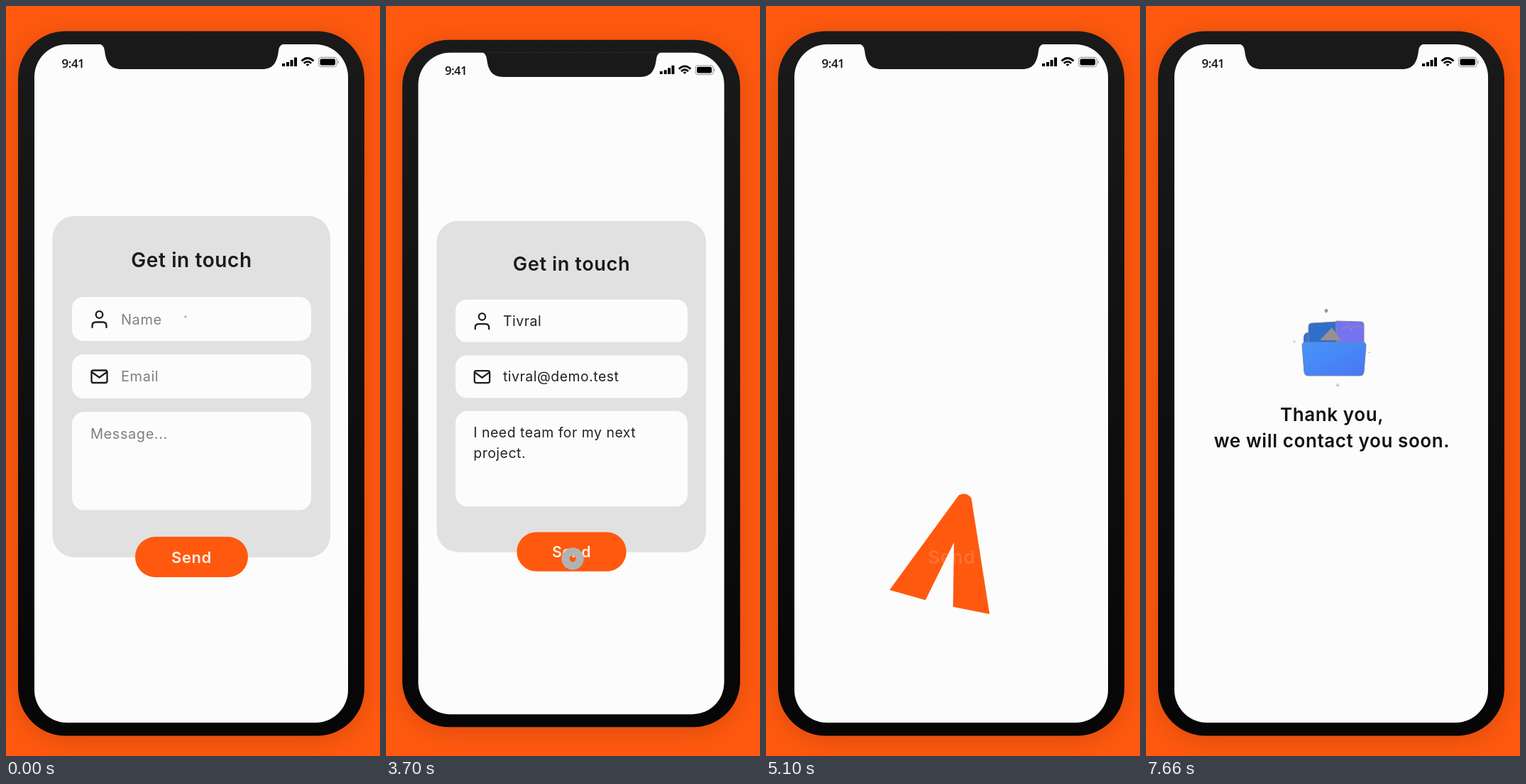
Recreate the animation shown at these times as an HTML page. Size 527 px wide and 1057 px high, loop 7700 ms.

```html
<!DOCTYPE html>
<html lang="en">
<head>
<meta charset="utf-8">
<title>Contact form</title>
<style>
  html, body { margin: 0; width: 100%; height: 100%; overflow: hidden; background: #ff590f; }
  svg { display: block; width: 100vw; height: 100vh; font-family: Inter, sans-serif; }
  #body { filter: drop-shadow(0 5px 18px rgba(0, 0, 0, .15)); }
  .field { fill: #fcfcfc; }
  .input { font-size: 20px; letter-spacing: .55px; fill: #222; }
  .bold { font-weight: 600; letter-spacing: .6px; text-anchor: middle; }
  .icon { fill: none; stroke: #1c1c1c; stroke-width: 2.3; stroke-linecap: round; stroke-linejoin: round; }
</style>
</head>
<body>
<svg viewBox="0 0 527 1057">
  <defs>
    <linearGradient id="case" x2="0" y2="1">
      <stop stop-color="#1a1a1a"/><stop offset="1" stop-color="#060606"/>
    </linearGradient>
    <linearGradient id="blue" x2="1" y2="1">
      <stop stop-color="#4596f8"/><stop offset="1" stop-color="#4a76f4"/>
    </linearGradient>
  </defs>

  <g id="phone">
    <rect id="body" x="17" y="35.5" width="488" height="993" rx="67" fill="url(#case)"/>
    <rect x="40" y="54" width="442" height="956" rx="46" fill="#fcfcfc"/>
    <path d="M130 53.500C136 54 138 57 139 63C141 80 147 89 163 89H361C376 89 382 80 384 63C385 57 387 54 393 53.500Z" fill="#191919"/>

    <text x="78.500" y="86.500" font-family="Open Sans, sans-serif" font-size="17" font-weight="600" letter-spacing="-.5" fill="#111">9:41</text>
    <path d="M391 85V81M397 85V79M402.500 85V76M408 85V72.500" stroke="#000" stroke-width="4"/>
    <g fill="none" stroke="#000" stroke-width="2.700">
      <path d="M416.500 77.500Q425 69.500 433.500 77.500M419.800 80.800Q425 76 430.200 80.800"/>
      <path d="M422.500 82.500Q425 80.500 427.500 82.500L425 85Z" fill="#000" stroke="none"/>
    </g>
    <rect x="440.500" y="72.500" width="25.500" height="13" rx="3.500" fill="none" stroke="#aaa" stroke-width="1.300"/>
    <rect x="442.500" y="74.500" width="21.500" height="9" rx="2" fill="#000"/>
    <path d="M468 77V81" stroke="#aaa" stroke-width="1.500"/>
  </g>

  <g id="form">
    <g id="card">
      <rect x="65.500" y="296" width="391.500" height="481" rx="31" fill="#e1e1e1"/>
      <text class="bold" x="261.500" y="368" font-size="28" fill="#1a1a1a">Get in touch</text>
      <rect class="field" x="93" y="410" width="337" height="62" rx="16"/>
      <rect class="field" x="93" y="491" width="337" height="62" rx="16"/>
      <rect class="field" x="93" y="572" width="337" height="138.500" rx="17"/>
      <g class="icon">
        <circle cx="131.500" cy="435" r="4.800"/>
        <path d="M121.500 453V450.500Q121.500 445.500 127 445.500H136Q141.500 445.500 141.500 450.500V453"/>
        <rect x="120.500" y="513.500" width="22" height="17.500" rx="2.500"/>
        <path d="M121 516L131.500 523.500L142 516"/>
      </g>
      <text class="input" id="name" x="162" y="448.500"/>
      <text class="input" id="email" x="162" y="529"/>
      <text class="input" id="line1" x="119" y="610"/>
      <text class="input" id="line2" x="119" y="640"/>
    </g>
    <path id="plane" fill="#ff590f" stroke="#ff590f" stroke-linejoin="round"/>
    <text class="bold" id="send" font-size="22" y="8" fill="#fff0e8">Send</text>
  </g>
  <circle id="ring" fill="none" stroke="#b2b2b2"/>

  <g id="thanks">
    <path d="M222 514V468Q222 460 229 460H300Q307 460 307 468V514Z" fill="#3b6fd0"/>
    <g id="papers">
      <path d="M229 510V452Q229 447 234 447L268 445V510Z" fill="#2f6fcb" stroke="#7f868f"/>
      <path d="M268 510V444L303 445Q307 445 307 449V510Z" fill="#7573f2" stroke="#8a83a8"/>
      <path d="M276 456L284 451L289 456L297 450L303 453" fill="none" stroke="#8c82c4" stroke-width="2"/>
      <path d="M245 471L262 453L275 471Z" fill="#96918f"/>
    </g>
    <path id="flap" fill="url(#blue)" stroke="#6d86b4"/>
    <path d="M254 426L257 429.500L254 433L251 429.500Z" fill="#999"/>
    <path d="M209 470L211 474H207ZM315 486.500L317 489H313ZM270 531L273 536H267Z" fill="#ccc"/>
    <g class="bold" font-size="26" fill="#111">
      <text x="262" y="585">Thank you,</text>
      <text x="262" y="622">we will contact you soon.</text>
    </g>
  </g>
</svg>

<script>
const LOOP = 7700;
const el = Object.fromEntries([...document.querySelectorAll('[id]')].map(e => [e.id, e]));
const set = (e, attrs) => { for (const k in attrs) e.setAttribute(k, attrs[k]); };

const mix = (a, b, p) => a + (b - a) * p;
const progress = (t, a, b) => Math.min(1, Math.max(0, (t - a) / (b - a)));
const smooth = p => p * p * (3 - 2 * p);
const easeOut = p => 1 - (1 - p) ** 2;

// Smooth interpolation through [time, value] stops.
function track(t, ...stops) {
  let value = stops[0][1];
  for (let i = 1; i < stops.length; i++)
    value = mix(value, stops[i][1], smooth(progress(t, stops[i - 1][0], stops[i][0])));
  return value;
}

const zoom = scale => `translate(261 531.5) scale(${scale}) translate(-261 -531.5)`;

// Half outlines: tip x, tip y, tip control y, base x, base y, inner x, inner y, notch y
const PILL = [0, 6.5, 6.5, 51, 6.5, 25, 6.5, 6.5];
const BLUNT = [9, -81, -88, 72.5, 72, 20, 74, -14.5];
const SHARP = [0, -68, -68, 65, 72, 14, 72, -20];
const morph = (a, b, p) => a.map((v, i) => mix(v, b[i], p));
const outline = ([tx, ty, cy, bx, by, ix, iy, ny]) =>
  `M${-bx} ${by}L${-tx} ${ty}Q0 ${cy} ${tx} ${ty}L${bx} ${by}L${ix} ${iy}L0 ${ny}L${-ix} ${iy}Z`;

function type(t, e, text, start, end, placeholder = '') {
  const typed = text.slice(0, Math.ceil(text.length * progress(t, start, end)));
  e.textContent = typed || placeholder;
  e.style.fill = typed ? '' : '#808080';
}

// Tap marker: start, duration, x, y
const TAPS = [[-24, 560, 253, 438], [790, 600, 253, 522], [2150, 450, 253, 606], [3380, 600, 263, 779]];

function drawTap(t) {
  const tap = TAPS.find(([start, length]) => t > start && t < start + length);
  el.ring.style.display = tap ? '' : 'none';
  if (!tap) return;
  const p = (t - tap[0]) / tap[1];
  const outer = 20 * easeOut(p), hole = 20 * Math.max(0, (p - .4) / .6);
  set(el.ring, { cx: tap[2], cy: tap[3], r: (outer + hole) / 2, 'stroke-width': Math.max(0, outer - hole) });
}

function drawForm(t) {
  type(t, el.name, 'Tivral', 500, 780, 'Name');
  type(t, el.email, 'tivral@demo.test', 1440, 2110, 'Email');
  type(t, el.line1, 'I need team for my next', 2400, 2550, 'Message...');
  type(t, el.line2, 'project.', 2550, 2620);

  // The form is pressed slightly deeper than the phone around it.
  const press = Math.sin(Math.PI * progress(t, 3400, 4120));
  set(el.phone, { transform: zoom(1 - .0255 * press) });
  set(el.form, { transform: zoom(1 - .031 * press) });

  const swell = easeOut(progress(t, 3960, 4120));
  const size = 1 - progress(t, 4140, 4470) ** 2;
  const y = mix(777, 536.5 - 10 * swell, size);
  el.card.style.display = size > 0 ? '' : 'none';
  set(el.card, {
    transform: `translate(261.5 ${y}) scale(${size * (1 + .025 * swell)} ${size * (1 + .036 * swell)}) translate(-261.5 -536.5)`
  });
}

function drawPlane(t) {
  const fold = smooth(progress(t, 4440, 4900));
  const shape = morph(morph(PILL, BLUNT, fold), SHARP, smooth(progress(t, 5440, 5960)));
  const tilt = track(t, [4900, 0], [5100, 13.6], [5180, 13.6], [5420, -13.4], [5620, 0]);
  const y = track(t, [5440, 770], [5720, 811]) - 790 * progress(t, 5720, 6160) ** 2;
  const squash = track(t, [3960, 1], [4120, .95], [4440, 1]);
  set(el.plane, {
    d: outline(shape),
    transform: `translate(261.5 ${y + 6.5 * (1 - squash)}) rotate(${tilt}) scale(1 ${squash})`,
    'stroke-width': 57 * (1 - fold),
    opacity: 1 - progress(t, 5920, 6160)
  });
  const fade = progress(t, 4440, 5040);
  set(el.send, {
    transform: `translate(261.5 777) scale(${1 + .18 * fade})`,
    opacity: mix(1, .15, fade) * (1 - progress(t, 5180, 5340))
  });
}

function drawThanks(t) {
  const enter = easeOut(progress(t, 6400, 6940));
  set(el.thanks, { opacity: enter, transform: `translate(0 ${53 * (1 - enter)})` });
  const open = smooth(progress(t, 7240, 7660));
  set(el.papers, { transform: `translate(0 ${24 * (1 - open)})` });
  const half = mix(42, 45, open), top = mix(467, 474, open);
  const left = 265 - half, right = 265 + half;
  set(el.flap, {
    d: `M${left + 4} ${top}H${right - 4}Q${right} ${top} ${right} ${top + 5}L307 516Q306 521 302 521H228Q224 521 223 516L${left} ${top + 5}Q${left} ${top} ${left + 4} ${top}Z`
  });
}

function frame() {
  const t = performance.now() % LOOP;
  drawForm(t);
  drawPlane(t);
  drawTap(t);
  drawThanks(t);
  requestAnimationFrame(frame);
}
frame();
</script>
</body>
</html>
```
